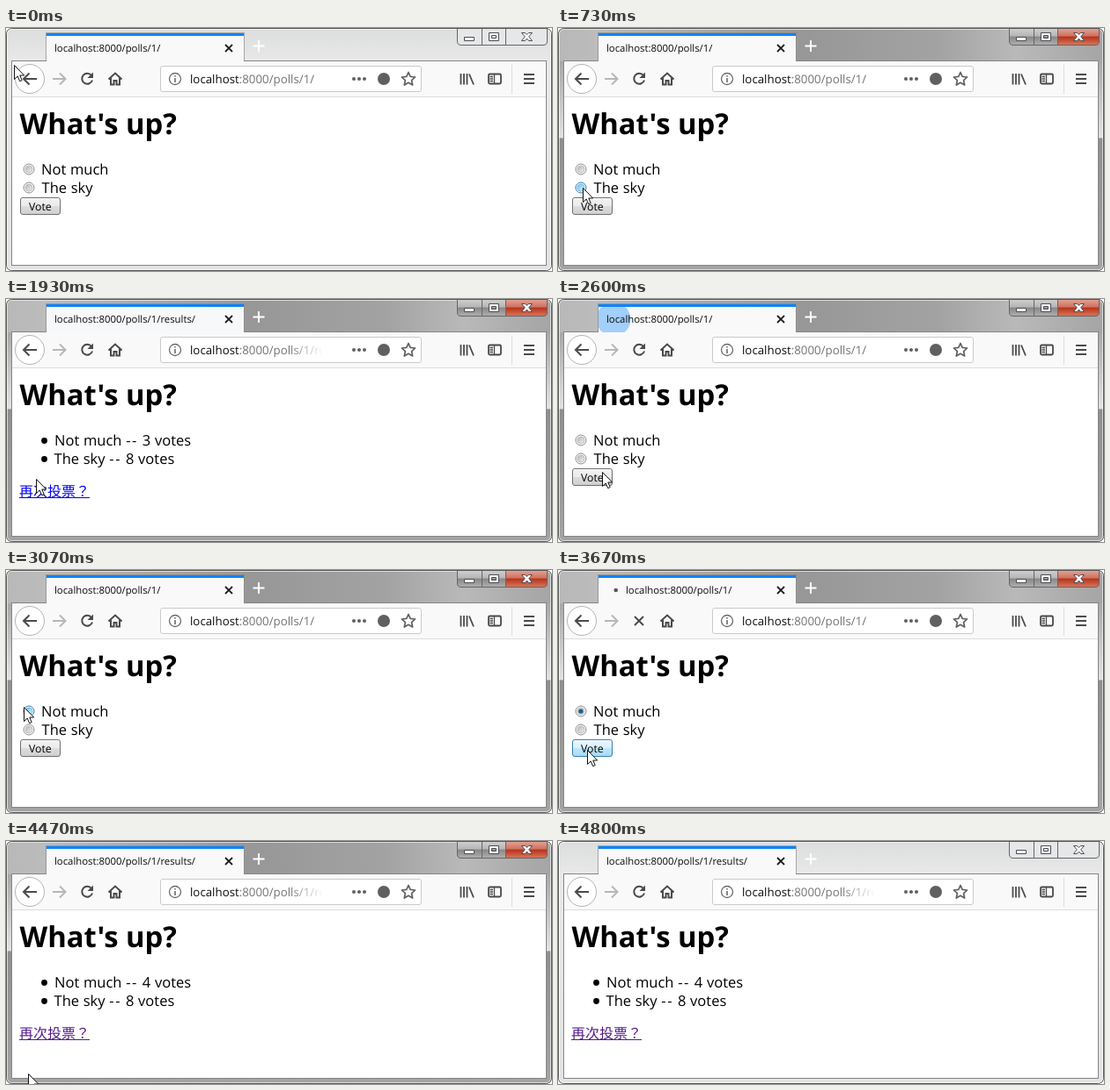
An HTML page for the animation above (4870 ms loop, 620 px wide and 277 px high).

```html
<!DOCTYPE html>
<html lang="en">
<head>
<meta charset="utf-8">
<title>Poll demo</title>
<style>
  html, body { margin: 0; width: 100%; height: 100%; overflow: hidden; background: #fff; }
  svg { display: block; width: 620px; height: 277px; }
  text { font-family: "Open Sans", "Noto Sans CJK SC", "Noto Sans CJK", sans-serif; text-rendering: geometricPrecision; white-space: pre; fill: #000; }
  .ui { font-size: 11.35px; fill: #0c0c0d; }
  .url { font-size: 13.3px; fill: #0c0c0d; }
  .body { font-size: 16.5px; word-spacing: .45px; }
  .dash { letter-spacing: 1.6px; }
  .icon { fill: none; stroke: #4a4a4c; stroke-width: 2; }
  .thin { stroke-width: 1.8; }
  #link text { font-family: "Noto Sans CJK SC", "Noto Sans CJK", sans-serif; font-size: 16px; fill: inherit; }
  #link tspan { font-family: "Noto Sans CJK TC", "Noto Sans CJK", sans-serif; }
  .radio .rim { fill: #f6f6f6; stroke: #8e8f8f; }
  .radio .well { fill: url(#well); stroke: #b5b8ba; stroke-width: .8; }
  .radio .dot { fill: #1b5e86; visibility: hidden; }
  .radio.hover .rim { fill: #e3f4fc; stroke: #3c7fb1; }
  .radio.hover .well { fill: url(#wellHot); stroke: #6db5dd; }
  .radio.on .dot { visibility: visible; }
  #vote rect { fill: url(#button); stroke: #707070; }
  #vote.hover rect { fill: url(#buttonHot); stroke: #3c7fb1; }
</style>
</head>
<body>
<svg viewBox="0 0 620 277">
  <defs>
    <linearGradient id="pale" x2="0" y2="1">
      <stop stop-color="#dcdddd"/><stop offset=".14" stop-color="#e9e9e9"/><stop offset="1" stop-color="#e2e3e3"/>
    </linearGradient>
    <linearGradient id="glass" x2="0" y2="1">
      <stop stop-color="#a9a9a9"/><stop offset=".14" stop-color="#a9a9a9"/><stop offset=".45" stop-color="#e2e2e2"/>
      <stop offset=".455" stop-color="#8f8f8f"/><stop offset="1" stop-color="#a4a4a4"/>
    </linearGradient>
    <linearGradient id="sheen">
      <stop stop-color="#b8b8b8"/><stop offset=".07" stop-color="#bcbcbc"/><stop offset=".45" stop-color="#979797"/>
      <stop offset=".7" stop-color="#a3a3a3"/><stop offset=".84" stop-color="#b9b9b9"/><stop offset="1" stop-color="#a5a5a5"/>
    </linearGradient>
    <linearGradient id="capGrey" x2="0" y2="1">
      <stop stop-color="#d2d2d2"/><stop offset=".48" stop-color="#b4b4b4"/><stop offset=".5" stop-color="#858585"/><stop offset="1" stop-color="#b0b0b0"/>
    </linearGradient>
    <linearGradient id="capRed" x2="0" y2="1">
      <stop stop-color="#e3a79a"/><stop offset=".48" stop-color="#cf6f5d"/><stop offset=".5" stop-color="#b5301a"/><stop offset="1" stop-color="#d9785a"/>
    </linearGradient>
    <linearGradient id="button" x2="0" y2="1">
      <stop stop-color="#f2f2f2"/><stop offset=".48" stop-color="#ebebeb"/><stop offset=".5" stop-color="#dddddd"/><stop offset="1" stop-color="#cfcfcf"/>
    </linearGradient>
    <linearGradient id="buttonHot" x2="0" y2="1">
      <stop stop-color="#eaf6fd"/><stop offset=".48" stop-color="#d9f0fc"/><stop offset=".5" stop-color="#bee6fd"/><stop offset="1" stop-color="#a7d9f5"/>
    </linearGradient>
    <linearGradient id="well" x2="1" y2="1"><stop stop-color="#b3b6b9"/><stop offset="1" stop-color="#f1f2f3"/></linearGradient>
    <linearGradient id="wellHot" x2="1" y2="1"><stop stop-color="#7cc4ec"/><stop offset="1" stop-color="#d3effc"/></linearGradient>
    <linearGradient id="fade" gradientUnits="userSpaceOnUse" x1="322" x2="360">
      <stop stop-color="#737373"/><stop offset="1" stop-color="#737373" stop-opacity="0"/>
    </linearGradient>
    <clipPath id="tabClip"><path d="M46 9H270V38H46Z"/></clipPath>
  </defs>

  <!-- window frame -->
  <rect id="frame" x=".5" y=".5" width="619" height="276" rx="6" stroke="#555"/>
  <path id="shine" d="M7 1.5H613Q618 2 618.5 7V38H1.5V7Q2 2 7 1.5Z" fill="url(#sheen)"/>
  <rect x="1.5" y="1.5" width="617" height="274" rx="5" fill="none" stroke="#fff" stroke-opacity=".65"/>
  <rect x="6.5" y="37.5" width="607" height="233" fill="#fff" stroke="#858585"/>
  <path d="M7 38H613V78H7Z" fill="#f9f9fa"/>
  <path d="M7 78.5H613" stroke="#dcdcdd"/>

  <!-- caption buttons -->
  <g stroke="#666">
    <path class="cap" d="M512.5 0V15Q512.5 19.5 517 19.5H540.5V0Z"/>
    <path class="cap" d="M540.5 0V19.5H567.5V0Z"/>
    <path id="capClose" d="M567.5 0V19.5H610Q614.5 19.5 614.5 15V0Z"/>
  </g>
  <path d="M512.5 .5H615" stroke="#555"/>
  <g fill="#fff" stroke="#4b4e55">
    <path d="M520.5 10.5H531.5V14.5H520.5Z"/>
    <path fill-rule="evenodd" d="M548.5 5.5H559.5V14.5H548.5ZM551.5 8.5H556.5V11.5H551.5Z"/>
    <path d="M585.5 5.5H589.5L591.5 7.5L593.5 5.5H597.5L593.7 9.8L597.5 14.5H593.5L591.5 12L589.5 14.5H585.5L589.3 9.8Z"/>
  </g>

  <!-- tab -->
  <path d="M45.5 38V5.5H270.5V38" fill="#f9f9fa" stroke="#000" stroke-opacity=".3"/>
  <path d="M46 6H270V9H46Z" fill="#0a84ff"/>
  <g clip-path="url(#tabClip)"><circle id="burst" cx="63" cy="23" fill="#0a84ff"/></g>
  <circle id="spinner" cy="23" r="2.3" fill="#55565a"/>
  <text id="title" class="ui" y="27"></text>
  <path d="M249 19L257 27M257 19L249 27" stroke="#1c1c1e" stroke-width="1.8"/>
  <path d="M287 14V27M280.5 20.5H293.5" stroke="#fff" stroke-width="2"/>

  <!-- toolbar -->
  <circle cx="27" cy="58" r="16.5" fill="#fff" stroke="#b4b4b6"/>
  <path class="icon" d="M35 58H20.5M26.5 51.5L20 58L26.5 64.5"/>
  <path class="icon" style="stroke:#b7b7b9" d="M53 58H67M61 51.5L67.5 58L61 64.5"/>
  <g id="reload"><path class="icon" d="M97 54A6 6 0 1 0 98 59.5"/><path d="M99 50.5V57H92.5Z" fill="#4a4a4c"/></g>
  <path id="arc" class="icon" d="M88.5 63A6 6 0 1 1 95.5 63"/>
  <path id="stop" class="icon" d="M87 53L97 63M97 53L87 63"/>
  <path class="icon" d="M116.5 58.5L124 51.5L131.5 58.5M119 57V64.5H122.5V60H125.5V64.5H129V57"/>
  <rect x="175.5" y="43.5" width="296" height="29" rx="2.5" fill="#fff" stroke="#cacacc"/>
  <circle cx="192" cy="58" r="6.5" fill="none" stroke="#6a6a6c" stroke-width="1.3"/>
  <path d="M192 57V62M192 54V55.6" stroke="#6a6a6c" stroke-width="1.6"/>
  <text class="url" x="209" y="63">localhost<tspan id="path"></tspan></text>
  <g fill="#606062">
    <circle cx="395" cy="58" r="2"/><circle cx="401" cy="58" r="2"/><circle cx="407" cy="58" r="2"/>
    <circle cx="429" cy="58" r="7"/>
  </g>
  <path id="star" fill="none" stroke="#606062" stroke-width="1.7" stroke-linejoin="round"/>
  <path class="icon thin" d="M516.5 52V64.5M520 52V64.5M523.5 52V64.5M526 52.5L531 64.5"/>
  <rect class="icon thin" x="548" y="52.5" width="14" height="11" rx="1.5"/>
  <path class="icon" style="stroke-width:1.3" d="M554.5 52.5V63.5M549.5 55.5H553M549.5 58H553M549.5 60.5H553"/>
  <path d="M574.5 42V75" stroke="#dedee0"/>
  <path class="icon thin" d="M588 53H600M588 58H600M588 63H600"/>

  <!-- page -->
  <text x="15.5" y="121" font-size="32.8" font-weight="700">What's up?</text>
  <g id="form">
    <g id="much" class="radio" transform="translate(26 161)"></g>
    <g id="sky" class="radio" transform="translate(26 182)"></g>
    <text class="body" x="40" y="167">Not much</text>
    <text class="body" x="40.5" y="188">The sky</text>
    <g id="vote">
      <rect x="16.5" y="193.5" width="45" height="19" rx="2.5"/>
      <path d="M18 194.5H60" stroke="#fff" stroke-opacity=".8"/>
      <text x="26" y="208" font-size="12.3">Vote</text>
    </g>
  </g>
  <g id="results">
    <circle cx="43.5" cy="161.5" r="3.4"/><circle cx="43.5" cy="182.5" r="3.4"/>
    <text class="body" x="55" y="167">Not much <tspan class="dash">--</tspan> <tspan id="count"></tspan> votes</text>
    <text class="body" x="54.5" y="188">The sky <tspan class="dash">--</tspan> 8 votes</text>
    <g id="link"><text x="15" y="225">再次投票<tspan lang="zh-Hant">？</tspan></text><path d="M15 226H95V227H15Z"/></g>
  </g>

  <g id="status">
    <path d="M7 249.5H195.5V270H7Z" fill="#f9f9fa"/>
    <path d="M7 249.5H195.5V270" fill="none" stroke="#dcdcde"/>
    <text id="statusText" class="ui" x="11" y="265" style="font-size:11.8px;fill:#333"></text>
  </g>

  <!-- pointer -->
  <g id="pointer">
    <path id="arrow" d="M.5 .5V16.5L4.2 13L6.7 18.7L9.2 17.6L6.8 12H11.7Z" fill="#fff" stroke="#111"/>
    <path id="hand" d="M-.5 13V1.5Q1 -.8 2.5 1.5V8Q4.5 6.5 5.5 8.5Q7.5 7.5 8.5 9.5Q11 8.5 11.5 11V16L9.5 20.5H1L-5 12.5Q-4.5 9.5 -2 11.5Z" fill="#fff" stroke="#111"/>
    <g id="ring" fill="none">
      <circle cx="14.5" cy=".5" r="6.2" stroke="#7cc3d6" stroke-width="3.4"/>
      <circle cx="14.5" cy=".5" r="6.2" stroke="#d4f1f8" stroke-width="2" stroke-dasharray="24 15"/>
    </g>
  </g>
</svg>
<script>
const LOOP = 4870, FPS = 15;
const $ = id => document.getElementById(id);
const show = (id, on) => { $(id).style.display = on ? "" : "none"; };
const within = (s, ...spans) => spans.some(([from, to]) => s >= from && s < to);

// pointer stops: step, x, y
const stops = [
  [0, 9, 42], [8, 28, 182], [12, 28, 182], [16, 37, 205], [24, 37, 205], [28, 34, 205],
  [32, 34, 205], [33, 41, 212], [36, 43, 212], [39, 50, 197], [40, 36, 168], [46, 20, 156],
  [48, 20, 156], [50, 21, 163], [51, 21, 163], [54, 33, 204], [58, 31, 207], [61, 31, 207], [67, 25, 265]
];
const burstStarts = [1655, 2588, 3983];
const BURST = 375;

for (const id of ["much", "sky"])
  $(id).innerHTML = '<circle class="rim" r="6"/><circle class="well" r="4"/><circle class="dot" r="2.6"/>';

$("star").setAttribute("d", "M" + Array.from({ length: 10 }, (_, i) => {
  const r = i % 2 ? 3.8 : 8, a = i * Math.PI / 5;
  return (457 + r * Math.sin(a)).toFixed(1) + " " + (58.5 - r * Math.cos(a)).toFixed(1);
}).join("L") + "Z");

function pointerAt(s) {
  const i = stops.findIndex(p => p[0] >= s);
  if (i < 1) return stops[0].slice(1);
  const [s0, x0, y0] = stops[i - 1], [s1, x1, y1] = stops[i];
  const k = (s - s0) / (s1 - s0);
  return [x0 + (x1 - x0) * k, y0 + (y1 - y0) * k].map(Math.round);
}

function drawFrame(active) {
  $("frame").setAttribute("fill", active ? "url(#glass)" : "url(#pale)");
  show("shine", active);
  document.querySelectorAll(".cap").forEach(c => c.setAttribute("fill", active ? "url(#capGrey)" : "#e6e7e8"));
  $("capClose").setAttribute("fill", active ? "url(#capRed)" : "#e6e7e8");
}

function drawTab(s, results) {
  const path = ":8000/polls/1/" + (results ? "results/" : "");
  const loading = within(s, [18, 25], [36, 39], [55, 60]);
  $("title").textContent = "localhost" + path;
  $("title").setAttribute("x", loading ? 77 : 55);
  $("path").textContent = path;
  $("path").setAttribute("fill", results ? "url(#fade)" : "#737373");

  show("spinner", loading);
  $("spinner").setAttribute("cx", 60 + 6 * Math.sin((s - 22) * 0.8));

  const now = s * 1000 / FPS;
  const start = burstStarts.find(b => now >= b && now < b + BURST);
  show("burst", start !== undefined);
  if (start !== undefined) {
    const p = (now - start) / BURST, e = p * (2 - p);
    $("burst").setAttribute("r", 2 + 278 * e);
    $("burst").setAttribute("opacity", 0.4 * (1 - e) ** 1.4);
  }

  const stop = within(s, [18, 21], [36, 38], [55, 58]);
  const arc = within(s, [21, 24], [38, 39], [58, 60]);
  show("stop", stop);
  show("arc", arc);
  show("reload", !stop && !arc);
}

function drawPage(s, results) {
  show("form", !results);
  show("results", results);
  $("much").classList.toggle("hover", within(s, [46, 52]));
  $("much").classList.toggle("on", within(s, [49, 56]));
  $("sky").classList.toggle("hover", within(s, [8, 14]));
  $("sky").classList.toggle("on", within(s, [12, 20]));
  $("vote").classList.toggle("hover", within(s, [16, 20], [54, 56]));
  $("count").textContent = s < 37 ? 3 : 4;
  $("link").setAttribute("fill", s < 37 ? "#0000ee" : "#551a8b");

  const sending = within(s, [18, 24]);
  show("status", sending || within(s, [33, 38]));
  $("statusText").textContent = sending ? "正在发送请求到 localhost..." : "localhost:8000/polls/1/";
}

function drawPointer(s) {
  const hand = within(s, [33, 37]);
  show("pointer", s < 68);
  show("hand", hand);
  show("arrow", !hand);
  show("ring", within(s, [19, 25]));
  if (s < 68) $("pointer").setAttribute("transform", `translate(${pointerAt(s)})`);
}

let last = -1;
function tick(time) {
  const s = Math.floor((time % LOOP + 4) * FPS / 1000);
  if (s !== last) {
    const results = within(s, [20, 37], [56, 73]);
    drawFrame(within(s, [9, 72]));
    drawTab(s, results);
    drawPage(s, results);
    drawPointer(s);
    last = s;
  }
  requestAnimationFrame(tick);
}
tick(performance.now());
</script>
</body>
</html>
```
